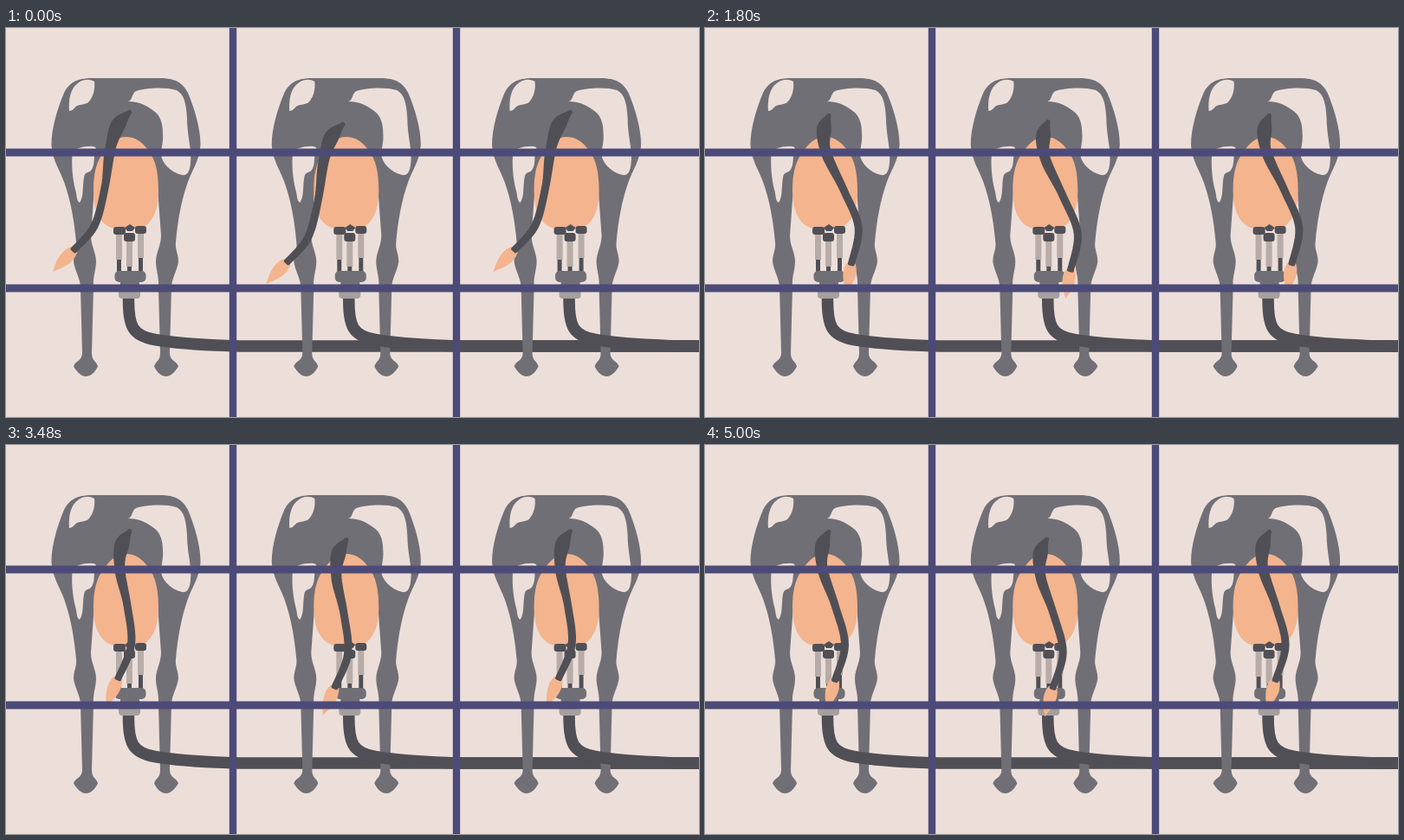
An HTML page that plays this animation: 800 px wide and 450 px high, repeating every 5040 ms.

```html
<!DOCTYPE html>
<html lang="en">
<head>
<meta charset="utf-8">
<title>Milking stalls</title>
<style>
html, body { margin: 0; width: 100%; height: 100%; overflow: hidden; background: #ecdfda; }
svg { display: block; width: 100vw; height: 100vh; }
</style>
</head>
<body>
<svg viewBox="0 0 800 450" preserveAspectRatio="xMidYMid meet">
  <defs>
    <path id="half" fill="#716f76" d="M140 58H100C80 58 73 64 67 75C59 94 52 118 52.500 136C54 154 62 164 67 178
      C75 200 79 225 81 248C82 256 78 261 78 270C79 280 86 290 86 300L88 376C88 385 80 385 78 391.500
      C83 399 87 403 92 403C98 403 102 399 106 391.500C104 385 99 385 99 376L101 300C100 288 104 280 104 270
      C104 260 98 252 98 240L102 185L140 126Z"/>
    <g id="cow">
      <use href="#half"/>
      <use href="#half" transform="translate(277) scale(-1 1)"/>
      <g fill="#ecdfda">
        <path d="M73 96C72 84 74 69 84 63C90 59 97 59 102 62C103 70 101 80 95 86C91 89 86 88 82 90C79 92 77 96 73 96Z"/>
        <path d="M141 85C146 84 145 76 150 73C161 69 185 68 197 72C206 77 208 88 209 104C209 125 215 142 213 156
          C212 167 209 171 203 170C190 167 180 156 179 147C179 138 182 132 181 122C181 110 178 102 172 97C163 90 155 85 141 85Z"/>
        <path d="M77 142C82 139 89 137 95 137Q102 136 104 139C100 146 104 158 98 165C95 168 91 166 90 173
          C88 184 90 195 85 202C81 200 82 193 80 187C77 175 75 157 77 142Z"/>
      </g>
      <path fill="#f3b48e" d="M138 126C150 126 157 132 164 141C173 152 176 168 176 188C176 212 168 229 153 232
        H126C110 230 101 213 101 188C101 168 104 155 113 143C120 133 128 126 138 126Z"/>
    </g>
    <g id="cups">
      <path fill="#504f55" d="M128 262h5v22h-5zM140 270h5v14h-5zM153 262h5v22h-5z"/>
      <path fill="#b7aca8" d="M127 236h7v32h-7zM139 244h7v32h-7zM152 236h7v30h-7z"/>
      <g fill="#504f55">
        <rect x="124" y="230" width="14" height="9" rx="3"/>
        <rect x="149" y="229" width="13" height="9" rx="3"/>
        <path d="M137 231L143 227L149 231L146 235H140Z"/>
        <rect x="136" y="237" width="13" height="10" rx="3"/>
      </g>
      <path fill="#a5a09f" d="M130 300H155V309Q155 313 151 313H134Q130 313 130 309Z"/>
      <path fill="#716f76" d="M132 290H154V304H132Z"/>
      <rect x="125.500" y="281" width="36" height="13" rx="5" fill="#716f76"/>
    </g>
    <path id="hose" fill="none" stroke="#504f55" stroke-width="13.500"
      d="M141.500 312C141 345 146 356 172 360.500C200 365.500 235 367 270 368H810"/>
  </defs>
  <rect width="800" height="450" fill="#ecdfda"/>
  <g id="stalls"></g>
  <g id="tails"></g>
  <g stroke="#4c4a78">
    <path stroke-width="8.400" d="M262 0V450M520 0V450"/>
    <path stroke-width="8.800" d="M0 144H800M0 301H800"/>
  </g>
</svg>
<script>
const LOOP = 5040, STEP = 40, STALL = 254.3;
const NS = "http://www.w3.org/2000/svg";
const $ = id => document.getElementById(id);

// Turning points of the swing: [ms, position], 0 = left pose, 1 = right pose
const TURNS = [[0, 0], [150, -0.13], [1690, 1.03], [3080, 0.35], [4490, 1.06], [LOOP, 0.75]];

// Spine of the tail: root, hip, bend, middle, elbow, tuft start, tuft end
const LEFT = [[143, 97], [129, 113], [120, 142], [114, 185], [102, 229], [78, 257], [54, 282]];
const RIGHT = [[143, 101], [137.5, 118], [140.5, 145], [161.5, 188], [179, 231], [171, 273], [166, 306]];
const WIDTHS = [5, 17, 12, 9, 9, 8];

const mix = (a, b, u) => a + (b - a) * u;
const fmt = p => p[0].toFixed(2) + " " + p[1].toFixed(2);

function add(parent, tag, attrs) {
  const el = document.createElementNS(NS, tag);
  for (const k in attrs) el.setAttribute(k, attrs[k]);
  return parent.appendChild(el);
}

const tails = [0, 1, 2].map(i => {
  for (const part of ["cow", "hose", "cups"]) add($("stalls"), "use", { href: "#" + part, x: i * STALL });
  const group = add($("tails"), "g", {});
  return {
    group,
    x: i * STALL,
    low: i === 1,
    tuft: add(group, "path", { fill: "#f3b48e" }),
    cord: add(group, "path", { fill: "#504f55", stroke: "#504f55", "stroke-width": 4, "stroke-linejoin": "round" })
  };
});

function swingAt(t) {
  const i = TURNS.findIndex(([end]) => t < end);
  const [t0, a] = TURNS[i - 1], [t1, b] = TURNS[i];
  return mix(a, b, (t - t0) / (t1 - t0));
}

// Blends the two poses; the lower parts sag along an arc
function spineAt(u) {
  return LEFT.map(([x, y], i) => {
    const sag = Math.max(0, 12 * i - 42) * u * (1 - u);
    return [mix(x, RIGHT[i][0], u), mix(y, RIGHT[i][1], u) + sag];
  });
}

function catmull(a, b, c, d, u) {
  return b + 0.5 * u * (c - a + u * (2 * a - 5 * b + 4 * c - d + u * (3 * (b - c) + d - a)));
}

function cordPath(pts) {
  const last = WIDTHS.length - 1, n = 8, line = [];
  const at = i => pts[Math.max(0, Math.min(last, i))];
  for (let k = 0; k <= last * n; k++) {
    const i = Math.min(last - 1, Math.floor(k / n)), u = k / n - i;
    const [x, y] = [0, 1].map(c => catmull(at(i - 1)[c], at(i)[c], at(i + 1)[c], at(i + 2)[c], u));
    const ease = u * u * (3 - 2 * u);
    line.push([x, y, mix(WIDTHS[i], WIDTHS[i + 1], ease) / 2 - 2]);
  }
  const left = [], right = [];
  line.forEach(([x, y, w], i) => {
    const p = line[Math.max(0, i - 1)], q = line[Math.min(line.length - 1, i + 1)];
    const dx = q[0] - p[0], dy = q[1] - p[1], l = Math.hypot(dx, dy);
    left.push(fmt([x + dy / l * w, y - dx / l * w]));
    right.unshift(fmt([x - dy / l * w, y + dx / l * w]));
  });
  return "M" + left.concat(right).join("L") + "Z";
}

function tuftPath([x, y], [ex, ey]) {
  const dx = ex - x, dy = ey - y, l = Math.hypot(dx, dy);
  const p = (along, side) => fmt([x + dx * along - dy / l * side, y + dy * along + dx / l * side]);
  return `M${p(-0.02, -5)}Q${p(-0.07, 0)} ${p(-0.02, 5)}C${p(0.2, 9)} ${p(0.5, 9)} ${p(1, 0)}` +
    `C${p(0.7, -4)} ${p(0.4, -11)} ${p(-0.02, -5)}Z`;
}

function draw(t) {
  const u = swingAt(t), pts = spineAt(u);
  const cord = cordPath(pts), tuft = tuftPath(pts[5], pts[6]);
  for (const tail of tails) {
    const dx = tail.low ? mix(-8, -1, u) : 0, dy = tail.low ? mix(14, 7, u) : 0;
    tail.group.setAttribute("transform", `translate(${tail.x + dx} ${dy})`);
    tail.cord.setAttribute("d", cord);
    tail.tuft.setAttribute("d", tuft);
  }
}

let start;
function tick(now) {
  if (start === undefined) start = now;
  draw(Math.floor(((now - start) % LOOP) / STEP) * STEP);
  requestAnimationFrame(tick);
}
draw(0);
requestAnimationFrame(tick);
</script>
</body>
</html>
```
